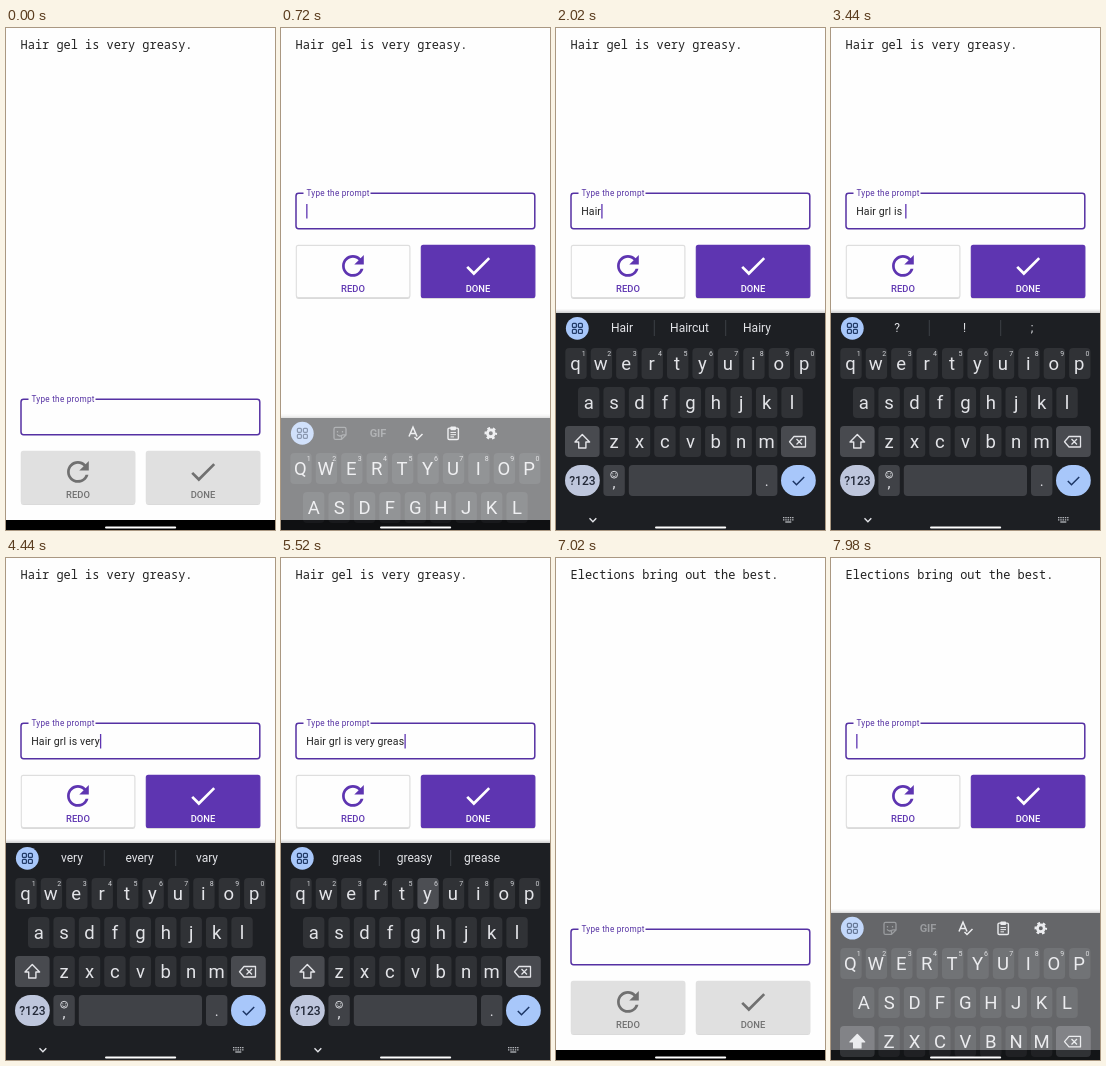
These frames come from a looping animation (269x502 px, 8 s). An HTML page:

```html
<!DOCTYPE html>
<html lang="en">
<head>
<meta charset="utf-8">
<title>Typing prompt</title>
<style>
html, body { margin: 0; width: 100%; height: 100%; overflow: hidden; background: #fefefe; }
svg { display: block; width: 100vw; height: 100vh; }
text { font-family: Roboto, sans-serif; white-space: pre; }
.mono { font: 11.95px "Noto Sans Mono", monospace; fill: #202020; }
.label { font-size: 8.2px; letter-spacing: .25px; fill: #5531a3; }
.input { font-size: 10.5px; letter-spacing: .14px; fill: #222; }
.btn { font-size: 9.4px; font-weight: 500; text-anchor: middle; }
.key { font-size: 18.5px; text-anchor: middle; fill: #e3e4e8; }
.digit { font-size: 7px; text-anchor: middle; fill: #d0d2d6; }
.hint { font-size: 12px; text-anchor: middle; fill: #e3e4e8; }
</style>
</head>
<body>
<svg id="stage" viewBox="0 0 269 502" preserveAspectRatio="none"></svg>
<script>
const LOOP = 8000;
const NEXT = 7240;          // second round starts here
const RAISE = 620;          // keyboard starts to open, within a round
const DONE = 5880;          // answer handed in
const LIFT = 206, SLIDE = 217;
const PURPLE = '#5e35b1', EDGE = '#5531a3', KEY = '#303236', WIDE = '#404247', FUNC = '#484a4f';
const LIGHT = '#e3e4e8', BLUE = '#a8c7fa', DIM = '#6b6e73', FAINT = '#b9bbc0';
const PROMPTS = ['Hair gel is very greasy.', 'Elections bring out the best.'];
const TYPED = 'Hair grl is very greasy.';
const COMMITS = [1320, 1580, 1760, 1960, 2160, 2380, 2560, 2720, 2880, 3040, 3200, 3380,
  3900, 4060, 4220, 4400, 4560, 4760, 4900, 5060, 5240, 5430, 5560, 5700];
const HINTS = {
  H: 'H Hey Hi', Ha: 'Ha Have Had', Hai: 'Hai Hair Hail', Hair: 'Hair Haircut Hairy',
  g: 'g good get', gr: 'gr great green', grl: 'grl girl gel',
  i: 'i in is', is: 'is isn’t it', v: 'v very visit', ve: 've very verse', ver: 'ver very verse', very: 'very every vary',
  gre: 'gre great green', grea: 'grea great greasy', greas: 'greas greasy grease', greasy: 'greasy greasier grease'
};

const stage = document.getElementById('stage');

function add(parent, tag, attrs = {}, text) {
  const el = document.createElementNS('http://www.w3.org/2000/svg', tag);
  for (const k in attrs) el.setAttribute(k, attrs[k]);
  if (text !== undefined) el.textContent = text;
  parent.appendChild(el);
  return el;
}
const box = (p, x, y, width, height, rx, fill, more) => add(p, 'rect', { x, y, width, height, rx, fill, ...more });
const label = (p, x, y, cls, text, more) => add(p, 'text', { x, y, class: cls, ...more }, text);
const line = (p, d, stroke, w = 1.3, more) => add(p, 'path', { d, stroke, fill: 'none', 'stroke-width': w, ...more });
const set = (el, k, v) => el.setAttribute(k, v);
const show = (el, on) => set(el, 'visibility', on ? 'visible' : 'hidden');
const clamp = v => Math.max(0, Math.min(1, v));
const ramp = (t, a, b) => clamp((t - a) / (b - a));

function bezier(x1, y1, x2, y2) {
  const at = (a, b, s) => 3 * a * s * (1 - s) ** 2 + 3 * b * s * s * (1 - s) + s ** 3;
  return x => {
    let lo = 0, hi = 1;
    for (let i = 0; i < 24; i++) {
      const mid = (lo + hi) / 2;
      if (at(x1, x2, mid) < x) lo = mid; else hi = mid;
    }
    return at(y1, y2, lo);
  };
}
const easeShow = bezier(.4, 0, .2, 1), easeHide = bezier(.4, 0, 1, 1);

function mix(a, b, p) {
  return `rgb(${a.map((v, i) => Math.round(v + (b[i] - v) * p))})`;
}

// Page
box(stage, 0, 0, 269, 502, 0, '#fefefe');
const prompt = label(stage, 14.6, 21, 'mono', PROMPTS[0]);
box(stage, 0, 492, 269, 10, 0, '#000');
const form = add(stage, 'g');

const field = add(form, 'g');
box(field, 15, 371.3, 238.8, 35.4, 2.6, 'none', { stroke: EDGE, 'stroke-width': 1.5 });
box(field, 22.5, 369, 67, 5, 0, '#fefefe');
label(field, 25.5, 374.2, 'label', 'Type the prompt');
const input = label(field, 25.2, 393, 'input', '');
const cursor = box(field, 25, 382, 1.3, 14.5, 0, PURPLE);

function button(x, name, icon) {
  const g = add(form, 'g');
  box(g, x - .2, 424, 114, 53, 2.5, '#000', { opacity: .14 });
  return {
    face: box(g, x, 423.4, 113.6, 52.1, 2, '#e0e0e0', { 'stroke-width': 1.1 }),
    icon: add(g, 'path', { d: icon, transform: `translate(${x + 40.3} 427.6) scale(1.36)` }),
    name: label(g, x + 56.7, 470, 'btn', name)
  };
}
const redo = button(15.3, 'REDO', 'M17.65 6.35A7.96 7.96 0 0 0 12 4c-4.42 0-7.99 3.58-7.99 8s3.57 8 7.99 8c3.73 0 6.84-2.55 7.73-6h-2.08A5.99 5.99 0 0 1 12 18c-3.31 0-6-2.69-6-6s2.69-6 6-6c1.66 0 3.14.69 4.22 1.78L13 11h7V4z');
const done = button(140.3, 'DONE', 'M9 16.17 4.83 12l-1.42 1.41L9 19 21 7l-1.41-1.41z');

function paint(b, on, faceColor, ink, edge) {
  set(b.face, 'fill', mix([224, 224, 224], faceColor, on));
  set(b.face, 'stroke', mix([224, 224, 224], edge, on));
  const c = mix([112, 112, 112], ink, on);
  set(b.icon, 'fill', c);
  set(b.name, 'fill', c);
}

// Keyboard
const board = add(stage, 'g');
for (const h of [1, 2, 3.5]) box(board, 0, 285 - h, 269, h, 0, '#000', { opacity: .06 });
box(board, 0, 285, 269, 217, 0, '#1d1f23');
add(board, 'circle', { cx: 21.3, cy: 300.3, r: 11.4, fill: BLUE });
for (const x of [16.4, 22.4]) for (const y of [295.4, 301.4])
  box(board, x, y, 4, 4, 1, 'none', { stroke: '#213a66', 'stroke-width': 1.2 });

const tools = add(board, 'g');
line(tools, 'M54.5 294.5h9a1.5 1.5 0 0 1 1.5 1.5v6l-4.5 4.5h-6a1.5 1.5 0 0 1-1.5-1.5v-9a1.5 1.5 0 0 1 1.5-1.5zM65 302h-3a1.5 1.5 0 0 0-1.5 1.5v3M56.5 298v1.5M61.5 298v1.5M56 301.5q2 2.5 4.5 1', DIM);
label(tools, 97, 304.2, 'hint', 'GIF', { style: `font-size:11px;font-weight:700;fill:${DIM}` });
line(tools, 'M128 303.5l4-9.3 4 9.3M129.5 300.5h5M133.5 304l2.5 2.5 5.5-5.5', LIGHT, 1.5);
box(tools, 167, 295.2, 10.4, 11.4, 1.2, 'none', { stroke: LIGHT, 'stroke-width': 1.4 });
box(tools, 169.4, 293.6, 5.6, 3.6, .8, LIGHT);
line(tools, 'M169.5 299.5h5.5M169.5 301.7h5.5M169.5 303.9h3.5', LIGHT, 1);
add(tools, 'circle', { cx: 209.8, cy: 300.4, r: 3.4, fill: 'none', stroke: LIGHT, 'stroke-width': 2.8 });
add(tools, 'circle', { cx: 209.8, cy: 300.4, r: 5.2, fill: 'none', stroke: LIGHT, 'stroke-width': 2.2, 'stroke-dasharray': '2.72 2.725', 'stroke-dashoffset': 1.36 });

const strip = add(board, 'g');
line(strip, 'M98.3 292v16M169.7 292v16', '#3d4045', 1);
const hints = [66, 133.5, 201].map(x => label(strip, x, 304.4, 'hint', ''));

const keys = {}, letters = [];
[['qwertyuiop', 20, 320], ['asdfghjkl', 32.7, 359], ['zxcvbnm', 58.1, 398]].forEach(([row, x0, y], r) => {
  [...row].forEach((ch, i) => {
    const x = x0 + i * 25.42;
    keys[ch] = box(board, x - 10.7, y, 21.4, 31, 4, KEY);
    letters.push(label(board, x - (r ? 0 : .6), y + 22, 'key', ch));
    if (!r) label(board, x + 7.8, y + 8.2, 'digit', (i + 1) % 10);
  });
});
box(board, 9, 398, 34.6, 31, 4, FUNC);
box(board, 225, 398, 34.8, 31, 4, FUNC);
const shift = line(board, 'M26.3 406.5l-7.3 7.5h3.7v6h7.2v-6h3.7z', LIGHT, 1.4, { 'stroke-linejoin': 'round' });
line(board, 'M238 408.5h11.5v10.5H238l-4.5-5.25zM240.5 411l5.5 5.5M246 411l-5.5 5.5', LIGHT, 1.3, { 'stroke-linejoin': 'round' });

box(board, 9, 437, 34.8, 31, 15.5, '#bec6dc');
label(board, 26.4, 456.6, 'key', '?123', { style: 'font-size:12px;font-weight:500;fill:#232938' });
box(board, 47.4, 437, 21.4, 31, 4, WIDE);
add(board, 'circle', { cx: 58.1, cy: 446.7, r: 3.4, fill: 'none', stroke: LIGHT, 'stroke-width': .9 });
line(board, 'M56.8 445.3v1M59.4 445.3v1M56.3 447.7q1.8 2 3.6 0', LIGHT, .8);
label(board, 58.1, 459.5, 'key', ',', { style: 'font-size:15px' });
keys[' '] = box(board, 72.8, 437, 123.2, 31, 4, WIDE);
keys['.'] = box(board, 200, 437, 21.4, 31, 4, WIDE);
label(board, 210.7, 458, 'key', '.', { style: 'font-size:15px' });
const enter = box(board, 225, 437, 34.8, 31, 15.5, BLUE);
line(board, 'M236.8 453l3.7 3.7 7.7-7.7', '#1c3564', 1.5);
line(board, 'M33.5 490.3l3.4 3.4 3.4-3.4', LIGHT, 1.4);
line(board, 'M227 489.6h10.5M227 491.8h10.5', FAINT, 1.3, { 'stroke-dasharray': '1.4 .88' });
line(board, 'M229.3 494h6', FAINT, 1.3);

box(stage, 99, 498.4, 71.2, 2.2, 1.1, '#fff');

function drawBoard(t, round) {
  const rise = easeShow(ramp(round, RAISE + 8, RAISE + 266));
  const fall = t < NEXT ? easeHide(ramp(t, DONE + 24, DONE + 284)) : 0;
  set(board, 'transform', `translate(0 ${SLIDE * (1 - rise + fall)})`);
  set(board, 'opacity', rise * (1 - fall) ** 2.4);
}

function drawTyping(t, round) {
  const asking = t < DONE || t >= NEXT;
  const n = t < NEXT ? COMMITS.filter(c => c <= t).length : 0;
  const text = TYPED.slice(0, n);
  input.textContent = asking ? text : '';
  set(cursor, 'x', 25.2 + (n ? input.getComputedTextLength() + .2 : 0));
  const since = n ? t - COMMITS[n - 1] : round - 360;
  show(cursor, asking && round >= RAISE && since % 1000 < 500);

  const caps = n === 0;
  for (const el of letters) el.textContent = caps ? el.textContent.toUpperCase() : el.textContent.toLowerCase();
  set(shift, 'fill', caps ? LIGHT : 'none');
  show(tools, caps);

  const word = text.split(' ').pop();
  const words = (word ? HINTS[word] || '' : '? ! ;').split(' ');
  show(strip, !caps && words.length === 3);
  hints.forEach((el, i) => { el.textContent = words[i] || ''; });

  for (const ch in keys) set(keys[ch], 'fill', /[a-z]/.test(ch) ? KEY : WIDE);
  COMMITS.forEach((c, i) => {
    if (t >= c - 80 && t < c + 20) set(keys[TYPED[i].toLowerCase()], 'fill', '#4c4e53');
  });
  set(enter, 'fill', t >= DONE - 90 && t < DONE ? '#c3d8fb' : BLUE);
}

function drawPage(t, round) {
  const asking = t < DONE || t >= NEXT;
  set(form, 'transform', `translate(0 ${asking && round >= RAISE ? -LIFT : 0})`);
  const on = asking ? ramp(round, 20, 220) : 0;
  paint(redo, on, [254, 254, 254], [94, 53, 177], [222, 222, 222]);
  paint(done, on, [94, 53, 177], [255, 255, 255], [94, 53, 177]);

  const fresh = ramp(t, 6700, 7020);
  prompt.textContent = PROMPTS[t < 6680 ? 0 : 1];
  set(prompt, 'opacity', t < 6680 ? 1 - ramp(t, 6450, 6640) : fresh);
  set(field, 'opacity', t < DONE ? 1 : fresh);
}

function draw(t) {
  const round = t >= NEXT ? t - NEXT : t;
  drawPage(t, round);
  drawTyping(t, round);
  drawBoard(t, round);
}

let start;
function tick(now) {
  if (start === undefined) start = now;
  draw((now - start) % LOOP);
  requestAnimationFrame(tick);
}
draw(0);
requestAnimationFrame(tick);
</script>
</body>
</html>
```
